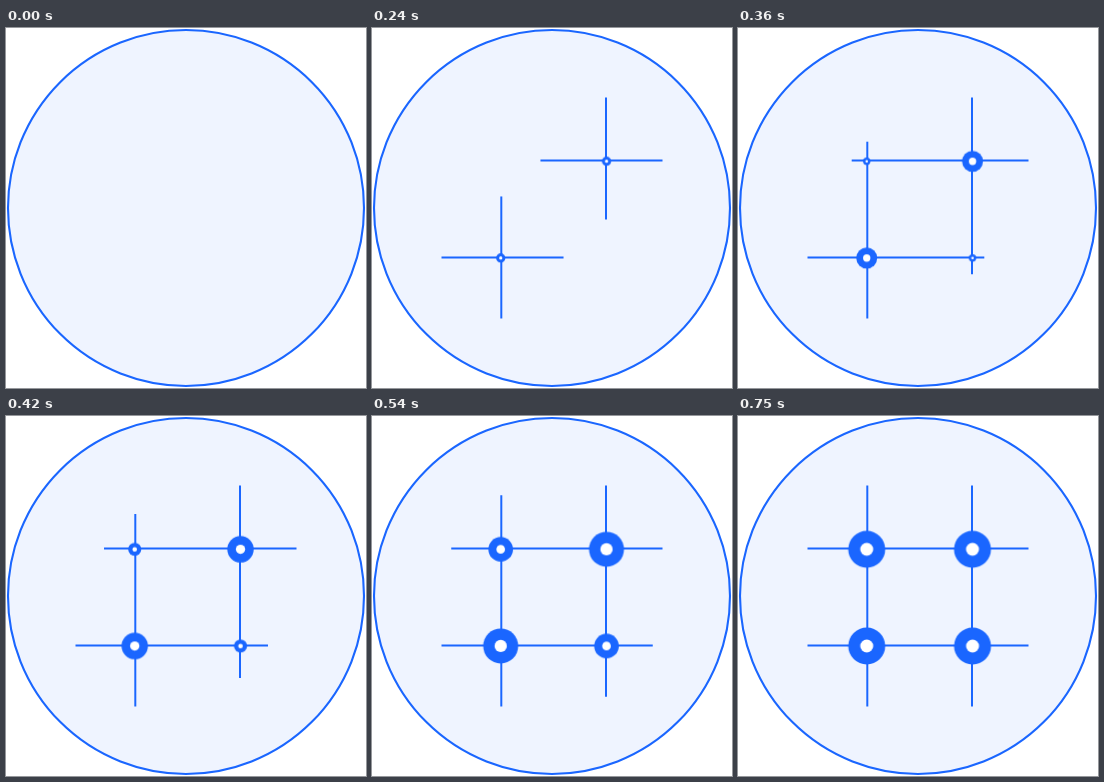
Animation of 360 by 360 pixels, one loop 2900 ms. Source, as an HTML page:

```html
<!DOCTYPE html>
<html lang="en">
<head>
<meta charset="utf-8">
<title>Crossing lines</title>
<style>
  html, body { margin: 0; width: 100%; height: 100%; overflow: hidden; background: #fff; }
  svg { display: block; width: 100vw; height: 100vh; }
  .disc { fill: #eff4ff; stroke: #1a66ff; stroke-width: 2.1; }
  .line { fill: none; stroke: #1a66ff; stroke-width: 2; stroke-dasharray: 1 2; stroke-dashoffset: 1; }
  .ring { fill: #1a66ff; }
  .hole { fill: #fff; }
</style>
</head>
<body>
<svg viewBox="0 0 360 360">
  <circle class="disc" cx="180" cy="180" r="178"/>
</svg>
<script>
const LOOP = 2900, STEP = 30;
const svg = document.querySelector("svg");
const clips = [];

function add(parent, tag, attrs) {
  const el = document.createElementNS("http://www.w3.org/2000/svg", tag);
  for (const key in attrs) el.setAttribute(key, attrs[key]);
  return parent.appendChild(el);
}

function animate(el, frames, delay, duration, easing) {
  const clip = el.animate(frames, { delay, duration, easing, fill: "both" });
  clip.pause();
  clips.push(clip);
}

// Each line is drawn outward from its own end.
const lines = [
  "M234 69.5V290.5",
  "M290.5 132.6H69.5",
  "M129.3 290.5V69.5",
  "M69.5 229.5H290.5"
];
for (const d of lines) {
  const line = add(svg, "path", { class: "line", d, pathLength: 1 });
  animate(line, { strokeDashoffset: [1, 0] }, 0, 750, "cubic-bezier(.32, 0, .14, 1)");
}

// x, y, start time
const dots = [
  [234.5, 133.3, 103],
  [128.7, 230, 103],
  [128.7, 133.3, 243],
  [234.5, 230, 243]
];
for (const [x, y, start] of dots) {
  const place = add(svg, "g", { transform: `translate(${x} ${y})` });
  const dot = add(place, "g", {});
  add(dot, "circle", { class: "ring", r: 18.5 });
  add(dot, "circle", { class: "hole", r: 6.5 });
  animate(dot, { transform: ["scale(0)", "scale(1)"] }, start, 510, "cubic-bezier(.195, 0, .685, 1)");
}

const origin = performance.now();
function draw() {
  const t = Math.max(0, performance.now() - origin) % LOOP;
  const time = Math.floor(t / STEP) * STEP;
  for (const clip of clips) clip.currentTime = time;
  requestAnimationFrame(draw);
}
draw();
</script>
</body>
</html>
```
